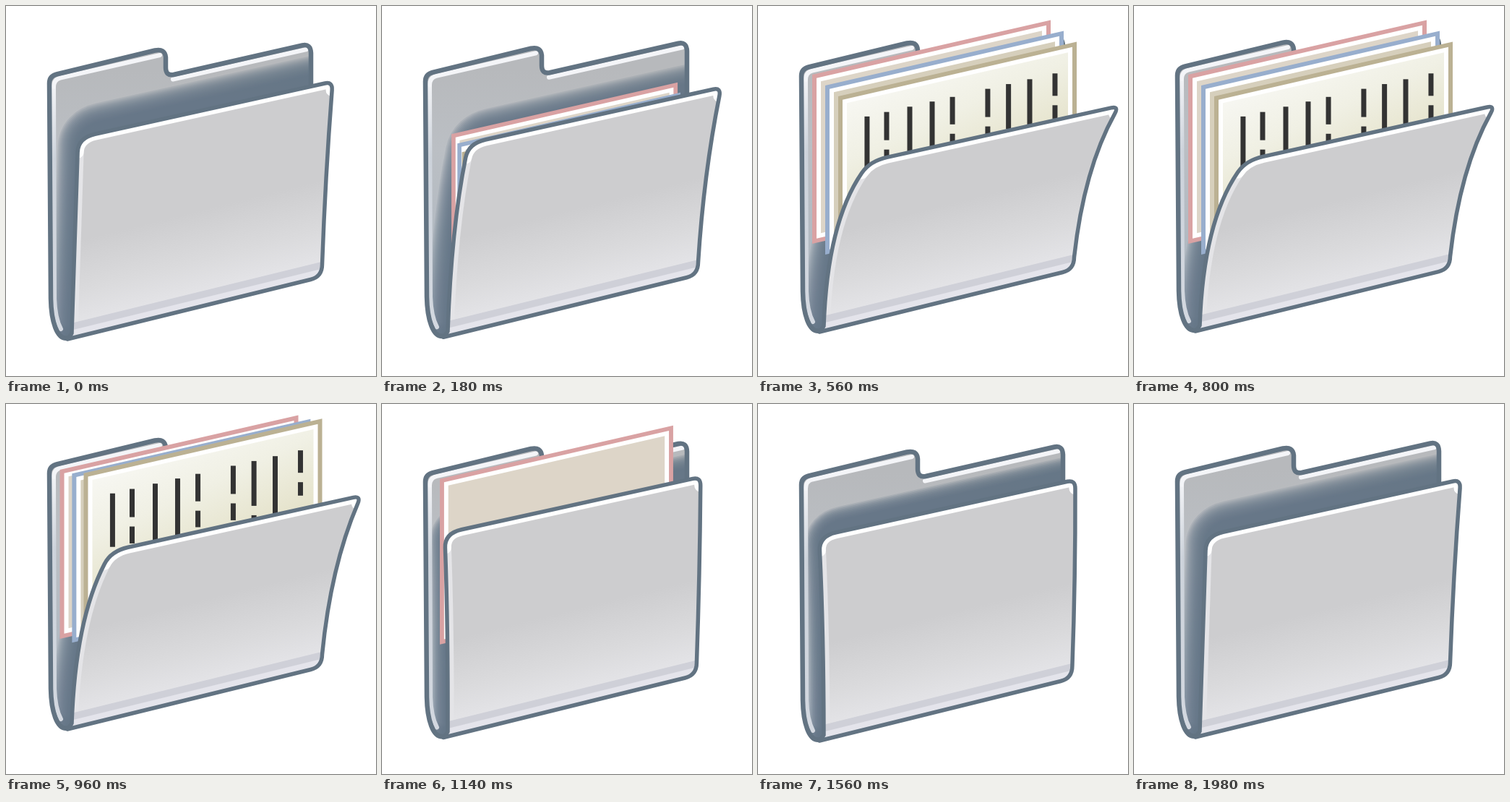
An HTML page with a canvas for the animation above (2000 ms loop, 512 by 512 pixels).

```html
<!DOCTYPE html>
<html lang="en">
<head>
<meta charset="utf-8">
<title>Folder</title>
<style>
html, body { margin: 0; width: 100%; height: 100%; overflow: hidden; background: #fff; }
canvas { display: block; width: 512px; height: 512px; }
</style>
</head>
<body>
<canvas id="stage" width="512" height="512"></canvas>
<script>
const ctx = document.getElementById('stage').getContext('2d');
const LOOP = 2000;
const SLATE = '#627382';
const SLOPE = -0.229;
const SHEET_W = 330, SHEET_H = 234;

// time, how far the cover is open, vertical shift of the folder
const POSES = [
  [0, 0.35, 0], [360, 0.92, -7], [560, 1, -10], [960, 0.89, -11], [1100, 0.33, -6],
  [1240, 0, 16], [1320, 0.055, 11], [1560, 0.17, 5], [LOOP, 0.35, 0]
];

const SHEETS = [
  { edge: '#d9a2a3', fill: '#ddd5c8' },
  { edge: '#98aecd', fill: '#d6cfbc' },
  { edge: '#bbb193', written: true }
];

// position across the sheet and length of the first dash, in writing order
const COLUMNS = [
  [0.909, 31], [0.803, 84], [0.714, 62], [0.627, 39], [0.479, 38],
  [0.394, 90], [0.3, 90], [0.203, 39], [0.121, 74]
];

const clamp = v => Math.max(0, Math.min(1, v));
const mix = (a, b, u) => a + (b - a) * u;
const ease = (t, start, length) => {
  const u = clamp((t - start) / length);
  return u * u * (3 - 2 * u);
};

// Hermite curve through the keys, flat at every turning point
function sample(keys, t) {
  let i = 0;
  while (i < keys.length - 2 && t >= keys[i + 1][0]) i++;
  const a = keys[i], b = keys[i + 1], span = b[0] - a[0];
  const u = (t - a[0]) / span, u2 = u * u, u3 = u2 * u;
  const slope = (k, c) => {
    const p = keys[k - 1], q = keys[k], n = keys[k + 1];
    if (!p || !n || (q[c] - p[c]) * (n[c] - q[c]) <= 0) return 0;
    return (n[c] - p[c]) / (n[0] - p[0]);
  };
  return [1, 2].map(c => mix(a[c], b[c], 3 * u2 - 2 * u3) +
    span * (slope(i, c) * (u3 - 2 * u2 + u) + slope(i + 1, c) * (u3 - u2)));
}

function toward([ax, ay], [bx, by], d) {
  const len = Math.hypot(bx - ax, by - ay);
  return [ax + (bx - ax) * d / len, ay + (by - ay) * d / len];
}

function stroke(path, color, width) {
  ctx.strokeStyle = color;
  ctx.lineWidth = width;
  ctx.stroke(path);
}

function linear(x1, y1, x2, y2, ...stops) {
  const g = ctx.createLinearGradient(x1, y1, x2, y2);
  stops.forEach(([at, color]) => g.addColorStop(at, color));
  return g;
}

function shifted(path, dx, dy) {
  const copy = new Path2D();
  copy.addPath(path, new DOMMatrix([1, 0, 0, 1, dx, dy]));
  return copy;
}

function clipped(path, paint) {
  ctx.save();
  ctx.clip(path);
  paint();
  ctx.restore();
}

const backShape = new Path2D(`M60 107 Q60 97 70 94.5 L206 61.5 Q220 58.5 221 71
  L221 85 Q221 97 232 95 L410 54.5 Q421.5 52 422 65 L422 340 L95 455
  L86 459.5 C70 463 62.5 435 62 405 Z`);
const topShine = new Path2D('M66 112 Q66 102 75 99.5 L213 68 M231 101.5 L416 60');
const sideShine = new Path2D('M66 112 L67 405 Q68 432 76 447');

// All in the folder's own frame, before its vertical shift
function coverShapes(open) {
  const bend = open * open;
  const tl = [70 + 85 * open, 176.5 + 48 * bend];
  const tr = [426.5 + 73 * open, 98.5 + 50 * bend];
  const br = [Math.min(437.5, 431.5 + 20 * open), 374.5];
  const leftMid = [Math.min(96, 86 + 28 * open), 310];
  const rightMid = [437 + 14 * open, 236];
  const l = toward(tl, leftMid, 20), topL = toward(tl, tr, 24);
  const r = toward(tr, rightMid, 12), topR = toward(tr, tl, 11);
  return {
    face: new Path2D(`M85 461 L${br[0] - 16} ${br[1] + 4} Q${br} ${br[0]} ${br[1] - 17}
      Q${rightMid} ${r} Q${tr} ${topR} L${topL} Q${tl} ${l} Q${leftMid} 91 453 Z`),
    left: new Path2D(`M91 453 Q${leftMid} ${l}`),
    top: new Path2D(`M${l} Q${tl} ${topL} L${topR} Q${tr} ${r}`),
    bottom: new Path2D(`M80 462.5 L${br[0] + 10} ${br[1] - 2}`)
  };
}

function drawBack(cover, open) {
  clipped(backShape, () => {
    ctx.fillStyle = linear(0, 90, 0, 460, [0, '#b7b9bc'], [0.3, '#bbbfc4'], [1, '#aab5c0']);
    ctx.fillRect(0, 0, 512, 512);
    const shade = shifted(cover.face, 10, -6);
    const reach = Math.min(38, 23.5 + 40 * open), steps = 14;
    ctx.globalAlpha = 0.17;
    for (let i = 0; i < steps; i++) stroke(shade, SLATE, 2 * mix(reach, 12, i / (steps - 1)));
    ctx.globalAlpha = 1;
    stroke(sideShine, linear(0, 110, 0, 450, [0, '#f2f3f6'], [0.3, '#cdd3db'], [1, '#d3d8e0']), 6);
    stroke(topShine, '#f4f5f8', 6);
  });
  stroke(backShape, SLATE, 6.5);
}

// Pop up large, settle, hop, then dive; front sheets hop first and higher
function sheetPose(i, t) {
  const start = 60 + 20 * i, peak = 1110 - 40 * i, dive = 120;
  if (t < start || t > peak + dive) return null;
  const rise = ease(t, start, 360 - start);
  const settle = ease(t, 360, 200);
  const hop = (16 + 11 * i) * ease(t, peak - 220, 220);
  const away = 1 - rise + ease(t, peak, dive);
  return {
    x: mix(mix(62 + 17 * i, 75 + 18 * i, settle) - hop * 0.12, 115, away),
    y: mix(mix(86 + 15 * i, 95 + 15 * i, settle) - hop, 228, away),
    scale: mix(mix(1.09, 1, settle), 0.87, away)
  };
}

function drawSheet(sheet, i, t) {
  const pose = sheetPose(i, t);
  if (!pose) return;
  const { x, y, scale } = pose;
  const panel = (inset, color) => {
    ctx.fillStyle = color;
    ctx.fillRect(inset, inset, SHEET_W - 2 * inset, SHEET_H - 2 * inset);
  };
  ctx.save();
  ctx.transform(scale, SLOPE * scale, 0, scale, x, y);
  panel(0, sheet.edge);
  panel(6, '#fff');
  panel(12, sheet.fill || linear(0, 0, 45, 200, [0, '#f8f8f4'], [0.45, '#f0f0e4'], [1, '#e2dfc4']));
  ctx.restore();
  if (sheet.written) {
    ctx.save();
    ctx.transform(scale, 0, 0, scale, x, y);
    drawWriting(t);
    ctx.restore();
  }
}

function drawWriting(t) {
  ctx.fillStyle = '#333';
  COLUMNS.forEach(([at, first], i) => {
    const grown = ease(t, 240 + 13 * i, 205);
    const x = at * SHEET_W, y = 37 + x * SLOPE;
    ctx.fillRect(x - 3.5, y, 7, first * grown);
    ctx.fillRect(x - 3.5, y + first + 13, 7, first * 0.6 * grown);
  });
}

function drawCover(cover) {
  ctx.fillStyle = linear(268, 283, 300, 412, [0, '#cdcdcf'], [0.5, '#dadadc'], [1, '#e8e8ec']);
  ctx.fill(cover.face);
  clipped(cover.face, () => {
    stroke(cover.left, '#e4e4e7', 17);
    stroke(cover.bottom, '#cfd0d8', 41);
    stroke(cover.bottom, '#e4e4eb', 22);
    stroke(cover.top, '#fff', 17);
  });
  stroke(cover.face, SLATE, 5.5);
}

function draw(t) {
  const [open, shift] = sample(POSES, t);
  const cover = coverShapes(open);
  ctx.clearRect(0, 0, 512, 512);
  ctx.lineJoin = ctx.lineCap = 'round';
  ctx.save();
  ctx.translate(0, shift);
  drawBack(cover, open);
  ctx.restore();
  SHEETS.forEach((sheet, i) => drawSheet(sheet, i, t));
  ctx.translate(0, shift);
  drawCover(cover);
  ctx.resetTransform();
}

function tick() {
  draw(performance.now() % LOOP);
  requestAnimationFrame(tick);
}
tick();
</script>
</body>
</html>
```
